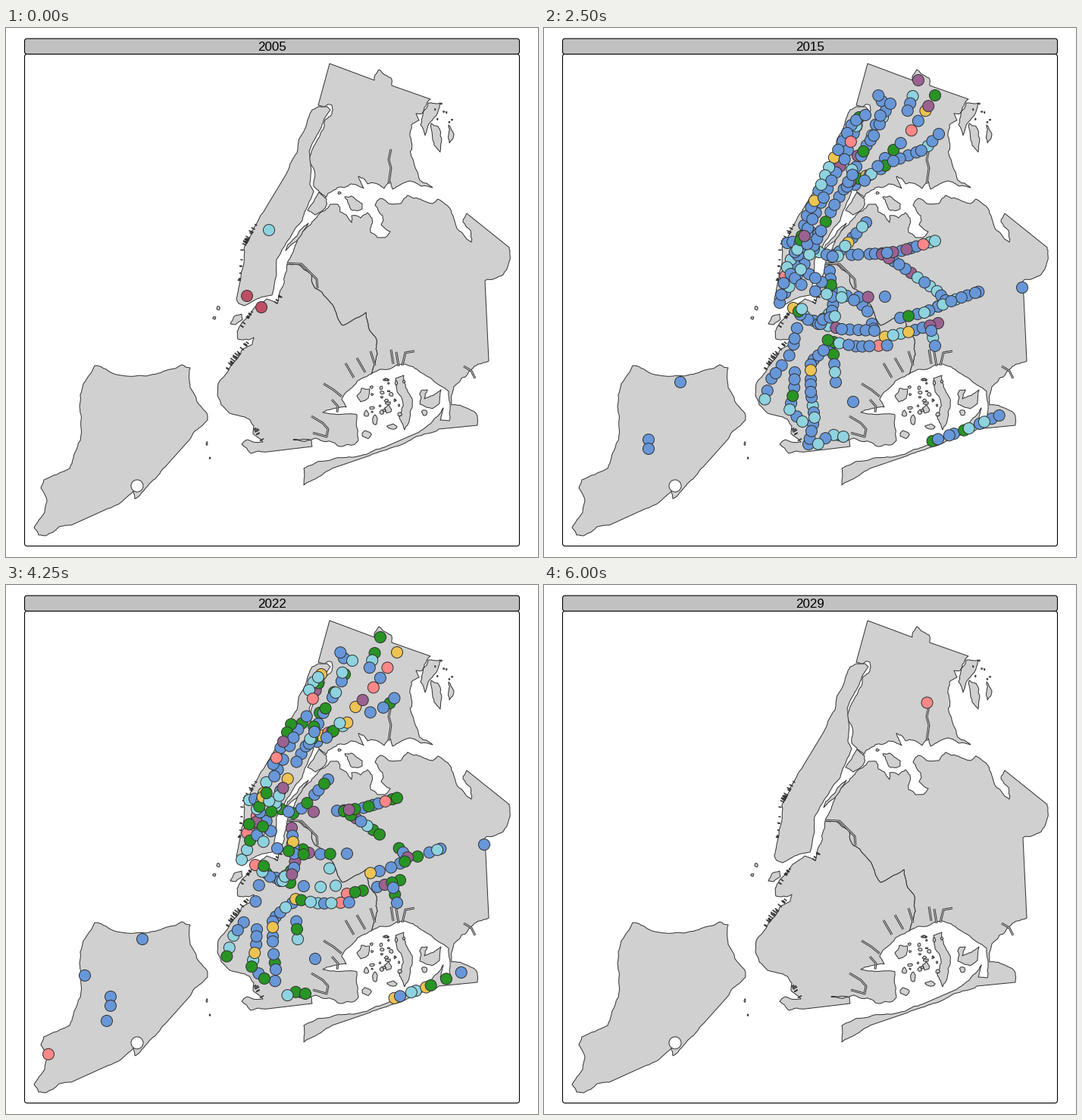
Animation of 702 by 699 pixels, one loop 6250 ms. Source, as a matplotlib script:

```python
import math
import random

import matplotlib.pyplot as plt
import numpy as np
from matplotlib.animation import FuncAnimation
from matplotlib.patches import Circle, FancyBboxPatch, Polygon

W, H, DPI = 702, 699, 64
PX = 72 / DPI
INK, LAND = "#333333", "#d0d0d0"
COLORS = {"blue": "#6797d8", "cyan": "#8ed3df", "red": "#be4e66",
          "purple": "#9b6291", "green": "#289424", "yellow": "#edc352",
          "salmon": "#ff8787"}
rng = random.Random(11)

fig = plt.figure(figsize=(W / DPI, H / DPI), dpi=DPI, facecolor="white")
ax = fig.add_axes([0, 0, 1, 1])
ax.set(xlim=(0, W), ylim=(H, 0))
ax.axis("off")


# ---- map helpers ----
def split(a, b, k):
    """Ragged path from a to b by midpoint displacement, without b."""
    dx, dy = b[0] - a[0], b[1] - a[1]
    if math.hypot(dx, dy) < 4:
        return [a]
    s = rng.gauss(0, k)
    mid = ((a[0] + b[0]) / 2 - dy * s, (a[1] + b[1]) / 2 + dx * s)
    return split(a, mid, k) + split(mid, b, k)


def coast(*pts, k=0.07):
    """Ragged shoreline through the key points; long edges stay straight."""
    out = []
    for a, b in zip(pts, pts[1:]):
        out += split(a, b, k) if math.dist(a, b) < 48 else [a]
    return out + [pts[-1]]


def land(pts):
    ax.add_patch(Polygon(pts, fc=LAND, ec=INK, lw=PX, joinstyle="round"))


def isle(*pts):
    land(coast(*pts, pts[0]))


def blob(x, y, r):
    flat = rng.uniform(.6, 1.5)
    land([(x + r * flat * math.cos(a) * rng.uniform(.6, 1.2),
           y + r / flat * math.sin(a) * rng.uniform(.6, 1.2))
          for a in np.linspace(0, math.tau, 9, endpoint=False)])


def creek(*pts):
    xs, ys = zip(*pts)
    ax.plot(xs, ys, color=INK, lw=2.8 * PX, solid_capstyle="butt")
    ax.plot(xs, ys, color="white", lw=.7 * PX, solid_capstyle="butt")


def piers(x0, y0, x1, y1, n, size):
    d = math.dist((x0, y0), (x1, y1))
    nx, ny = (y1 - y0) / d, (x0 - x1) / d
    for _ in range(n):
        t, k = rng.random(), size * rng.uniform(.3, 1)
        x, y = x0 + (x1 - x0) * t, y0 + (y1 - y0) * t
        ax.plot([x, x + nx * k], [y, y + ny * k], color=INK, lw=1.6 * PX)


# ---- map ----
land(coast(  # north
    (427, 47), (486, 69), (487, 62), (492, 55), (497, 60), (508, 66), (509, 76),
    (560, 94), (549, 113), (541, 113), (545, 122), (535, 128), (533, 143),
    (534, 166), (538, 178), (546, 201), (563, 211), (548, 209), (533, 202),
    (510, 213), (507, 203), (499, 212), (487, 205), (477, 206), (465, 196),
    (472, 212), (455, 206), (437, 211), (422, 224), (406, 209), (402, 180),
    (403, 163), (416, 137), (431, 109), (430, 102), (412, 102), (427, 47)))
land(coast(  # long island in the river
    (412, 104), (404, 108), (386, 149), (384, 165), (368, 196), (342, 239),
    (321, 278), (314, 291), (310, 330), (304, 358), (307, 364), (315, 367),
    (331, 358), (351, 353), (357, 325), (357, 306), (371, 282), (391, 254),
    (406, 216), (401, 207), (400, 163), (414, 135), (428, 108), (424, 104),
    (412, 104), k=.03))
border = coast(
    (371, 312), (385, 312), (403, 325), (408, 344), (423, 357), (431, 366),
    (444, 393), (456, 387), (475, 376), (480, 400), (489, 412), (490, 431),
    (482, 457), k=.05)
land(coast(  # east
    (371, 312), (381, 290), (400, 261), (411, 248), (428, 233), (438, 233),
    (441, 243), (449, 247), (456, 257), (456, 248), (468, 251), (477, 244),
    (483, 251), (481, 270), (490, 277), (500, 277), (507, 269), (495, 260),
    (497, 248), (487, 234), (494, 225), (505, 232), (522, 231), (530, 221),
    (563, 232), (570, 226), (583, 235), (594, 262), (614, 283), (603, 256),
    (608, 245), (664, 290), (665, 306), (656, 326), (632, 334), (637, 440),
    (618, 447), (591, 474), (588, 498), (610, 503), (622, 513), (622, 525),
    (571, 530)) + coast(  # south spit and bay
    (571, 530), (545, 539), (505, 556), (480, 565), (430, 582), (393, 604),
    (393, 582), (411, 573), (455, 567), (499, 554), (545, 534), (560, 523),
    (577, 502), (573, 518), (585, 519), (584, 480), (566, 468), (526, 444),
    (505, 451), (482, 457), k=.04) + border[::-1])
land(coast(  # south
    (371, 312), (361, 350), (358, 364), (344, 358), (328, 369), (305, 401),
    (306, 411), (320, 412), (327, 409), (325, 418), (313, 424), (297, 446),
    (280, 470), (279, 485), (284, 498), (295, 509), (321, 517), (327, 526),
    (326, 536), (339, 547), (318, 544), (311, 550), (323, 562), (345, 560),
    (404, 553), (403, 545), (379, 544), (409, 542), (441, 553), (460, 550),
    (465, 545), (463, 511), (431, 510), (418, 508), (449, 501), (443, 491),
    (464, 466), (482, 457), k=.05) + border[::-1])
land(coast(  # south-west island
    (117, 446), (146, 458), (170, 460), (201, 456), (232, 445), (243, 449),
    (243, 475), (265, 509), (266, 518), (243, 543), (210, 580), (182, 611),
    (170, 622), (168, 612), (130, 637), (86, 657), (70, 659), (52, 671),
    (43, 670), (37, 660), (51, 640), (54, 625), (46, 608), (50, 597),
    (84, 582), (98, 545), (97, 500), (102, 470), (117, 446), k=.04))
ax.add_patch(Circle((173, 605), 8, fc="white", ec=INK, lw=PX))

isle((398, 241), (413, 217), (423, 226), (421, 238), (408, 247))
isle((369, 294), (378, 280), (399, 258), (390, 273))
isle((447, 223), (456, 222), (470, 232), (470, 239), (457, 241))
isle((296, 391), (301, 381), (311, 378), (312, 385), (303, 392))
isle((557, 99), (573, 99), (570, 111), (553, 142), (547, 128))
isle((561, 126), (570, 130), (575, 147), (573, 164), (565, 155))
isle((584, 128), (591, 140), (585, 152))
isle((463, 486), (469, 476), (480, 477), (478, 489), (468, 494))
isle((514, 463), (525, 459), (536, 490), (533, 514), (526, 531), (519, 515), (524, 497))
isle((548, 479), (556, 478), (552, 490), (574, 478), (572, 496), (562, 503), (546, 497))
for x, y, r in [(477, 537, 6), (487, 519, 5), (510, 527, 5), (475, 510, 4),
                (504, 504, 5), (552, 508, 4), (275, 383, 2), (280, 370, 2.5),
                (265, 549, 1.5), (269, 568, 1), (440, 218, 2)]:
    blob(x, y, r)
for _ in range(24):
    blob(rng.uniform(480, 525), rng.uniform(464, 512), rng.uniform(1, 3))
for _ in range(7):
    blob(rng.uniform(565, 590), rng.uniform(100, 125), 1)

creek((505, 206), (508, 185), (505, 174), (508, 160))
creek((371, 311), (390, 312), (410, 332), (411, 344))
creek((403, 513), (418, 522), (425, 530), (423, 540), (405, 535))
creek((419, 470), (432, 478), (443, 487))
creek((523, 446), (527, 429), (539, 427))
creek((604, 447), (614, 453), (619, 463))
creek((430, 491), (438, 500), (437, 508))
for x, y, dx in [(448, 443, 11), (463, 436, 11), (481, 427, 6), (508, 425, 3), (515, 428, 3)]:
    creek((x, y), (x + dx, y + 19))
piers(331, 260, 314, 291, 16, -5)
piers(313, 292, 309, 335, 8, -3)
piers(326, 374, 312, 396, 10, -4)
piers(322, 414, 290, 455, 18, -6)
piers(361, 353, 352, 366, 6, 5)
piers(326, 528, 336, 546, 6, 5)

# ---- frame and title ----
for y, h, fc in [(34.5, 650, "none"), (14, 20.5, "#c1c1c1")]:
    ax.add_patch(FancyBboxPatch((24.5, y), 653, h, fc=fc, ec="black", lw=1.1 * PX,
                                boxstyle="round,pad=0,rounding_size=3.5"))
title = ax.text(351, 30, "", ha="center", va="baseline", color="black",
                family="Liberation Sans", size=17 * PX)

# ---- markers ----
stations = []


def line(n, *pts):
    """Spread n stations along a route, with uneven gaps."""
    xs, ys = np.array(pts, float).T
    along = np.r_[0, np.cumsum(np.hypot(np.diff(xs), np.diff(ys)))]
    for i in range(n):
        d = along[-1] * (i + rng.uniform(-.25, .25)) / (n - 1)
        x, y = np.interp(d, along, xs), np.interp(d, along, ys)
        stations.append((x, y, rng.random(), rng.random()))


line(24, (424, 115), (408, 124), (394, 150), (373, 190), (357, 228), (346, 250),
     (338, 283), (321, 315), (311, 363))
line(22, (416, 118), (397, 173), (382, 196), (369, 224), (354, 253), (335, 290), (322, 338))
line(26, (440, 87), (452, 107), (438, 138), (423, 160), (407, 194), (382, 236),
     (362, 275), (345, 310), (318, 350))
line(14, (516, 89), (503, 110), (478, 145), (450, 172), (420, 205), (398, 210))
line(14, (521, 140), (503, 160), (455, 178), (440, 190), (404, 203))
line(6, (494, 69), (476, 120))
line(8, (457, 100), (441, 119), (430, 150), (408, 176), (404, 203))
line(8, (362, 272), (346, 268), (330, 315), (340, 340))
line(8, (321, 284), (340, 280), (360, 295), (380, 302))
line(18, (380, 302), (400, 300), (444, 298), (470, 295), (517, 281))
line(8, (384, 300), (393, 293), (425, 257))
line(12, (446, 299), (465, 310), (502, 336), (519, 348), (530, 360))
line(8, (520, 368), (545, 358), (575, 348))
line(12, (338, 318), (367, 336), (393, 350), (425, 369), (436, 400))
line(6, (470, 383), (502, 376), (520, 368))
line(6, (358, 348), (393, 356), (450, 355))
line(8, (450, 408), (480, 402), (520, 390))
line(3, (511, 400), (516, 420))
line(10, (377, 321), (382, 372), (362, 391))
line(8, (329, 370), (341, 378), (351, 388), (384, 381))
line(8, (365, 391), (393, 398), (436, 400))
line(9, (382, 415), (414, 421), (461, 419))
line(6, (374, 411), (382, 430), (385, 468))
line(16, (369, 426), (352, 442), (352, 480), (357, 515), (349, 550))
line(11, (341, 368), (331, 408), (328, 427), (299, 465), (291, 492))
line(8, (331, 455), (330, 478), (324, 505), (341, 520))
line(4, (360, 551), (378, 537), (395, 540))
line(10, (512, 546), (556, 531), (603, 511))
rng.shuffle(stations)

# Lone sites with their first and last year
SITES = [(347, 267, "cyan", 2005, 2008), (318, 354, "red", 2005, 2012),
         (337, 369, "red", 2005, 2012), (631, 343, "purple", 2012, 2012),
         (631, 343, "blue", 2013, 2023), (138, 544, "blue", 2011, 2023),
         (138, 556, "blue", 2013, 2023), (56, 620, "blue", 2012, 2014),
         (104, 516, "blue", 2012, 2014), (104, 516, "blue", 2021, 2024),
         (180, 468, "blue", 2015, 2024), (133, 576, "blue", 2021, 2023),
         (42, 647, "cyan", 2017, 2021), (154, 590, "cyan", 2018, 2020),
         (56, 620, "salmon", 2021, 2024), (408, 494, "blue", 2015, 2022),
         (505, 155, "salmon", 2023, 2029)]

# Share of stations shown, and of each colour in the order of COLORS
SHOWN = ([2005, 2008, 2010, 2012, 2015, 2019, 2022, 2025, 2026, 2027, 2028],
         [0, .05, .25, .64, .97, .96, .76, .6, .25, .05, 0])
MIX_YEARS = [2012, 2015, 2019, 2022, 2025]
MIX = np.array([[.48, .66, .52, .38, .28],
                [.20, .16, .25, .22, .42],
                [.13, .00, .00, .00, .00],
                [.04, .04, .08, .07, .01],
                [.10, .08, .08, .20, .14],
                [.02, .04, .03, .09, .13],
                [.03, .02, .04, .04, .02]])


def markers(year):
    shown = np.interp(year, *SHOWN)
    steps = np.cumsum([np.interp(year, MIX_YEARS, row) for row in MIX])
    names = list(COLORS)
    out = [(x, y, names[np.searchsorted(steps, tone * steps[-1])])
           for x, y, rank, tone in stations if rank < shown]
    return out + [s[:3] for s in SITES if s[3] <= year <= s[4]]


marks = ax.scatter([], [], s=(15 * PX) ** 2, ec=INK, lw=PX, zorder=5)


def draw(i):
    year = 2005 + i
    shown = markers(year)
    title.set_text(str(year))
    marks.set_offsets([m[:2] for m in shown])
    marks.set_facecolor([COLORS[m[2]] for m in shown])
    return title, marks


ani = FuncAnimation(fig, draw, frames=25, interval=250, repeat=True, repeat_delay=0)
plt.show()
```
